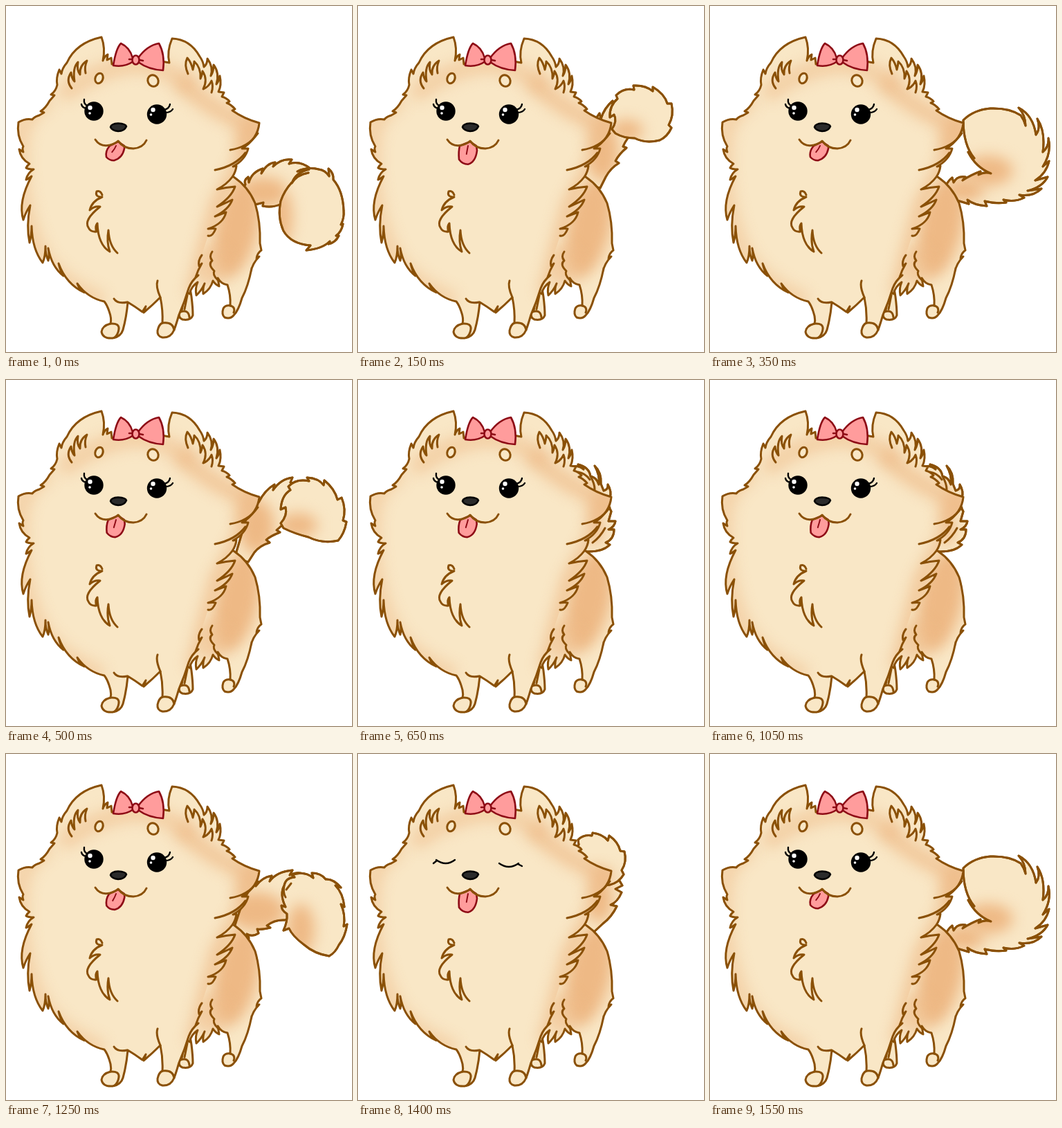
An HTML page for the animation above (1600 ms loop, 500x500 px).

```html
<!DOCTYPE html>
<html lang="en">
<head>
<meta charset="utf-8">
<title>Fluffy dog</title>
<style>
html, body { margin: 0; width: 100%; height: 100%; overflow: hidden; background: #fff; }
svg { display: block; width: 100vw; height: 100vh; }
.fill { fill: #f9e7c6; }
.ink { fill: none; stroke: #8a5006; stroke-width: 3; stroke-linecap: round; stroke-linejoin: round; }
.both { fill: #f9e7c6; stroke: #8a5006; stroke-width: 3; stroke-linecap: round; stroke-linejoin: round; }
.shade { fill: #eeb985; filter: url(#soft); }
.glow { fill: none; stroke: #eeb985; stroke-width: 26; filter: url(#soft); }
.pink { fill: #ff9c9c; stroke: #8e0c16; stroke-width: 2.6; stroke-linejoin: round; stroke-linecap: round; }
.lash { fill: none; stroke: #000; stroke-width: 2.4; stroke-linecap: round; }
</style>
</head>
<body>
<svg viewBox="0 0 500 500">
<defs>
  <filter id="soft" x="-70%" y="-70%" width="240%" height="240%" color-interpolation-filters="sRGB"><feGaussianBlur stdDeviation="10"/></filter>
  <clipPath id="baseClip"><path id="baseCut"/></clipPath>
  <clipPath id="tipClip"><path id="tipCut"/></clipPath>
  <clipPath id="rumpClip"><use href="#rump"/></clipPath>
  <clipPath id="coatClip"><use href="#coat"/></clipPath>
  <path id="rump" d="M290,240 L329,247 Q350,261 360,285 Q368,312 367,343 L369,353 Q363,357 362,365 L366,362 Q356,372 354,384 L355,379 Q350,405 341,422 Q336,440 329,447 Q324,453 316,450 Q311,446 314,437 Q317,432 324,433 Q325,418 320,403 Q311,402 306,393 L308,405 Q302,402 299,397 Q296,409 285,416 Q284,408 287,401 Q282,412 275,418 Q273,408 277,399 Q268,405 265,416 L240,400 Z"/>
  <path id="coat" d="M283,360 Q277,368 279,376 L283,372 Q277,382 274,392 L278,389 Q268,397 264,408 Q258,428 250,446 Q246,460 243,468 Q238,480 226,479 Q218,477 219,469 Q221,460 226,458 Q227,440 223,421 Q212,432 199,443 L202,434 L197,442 Q186,434 176,428 Q174,450 169,468 Q166,478 154,480 Q140,481 138,471 Q139,462 151,459 Q153,452 149,441 Q146,432 142,427 Q118,422 103,401 Q106,410 113,414 Q87,402 76,372 Q78,382 83,390 Q66,377 61,350 Q63,361 61,368 Q57,359 57,347 Q57,362 53,371 Q38,352 37,318 Q37,331 34,342 Q29,318 35,288 Q28,299 25,309 Q17,283 37,246 Q32,250 29,251 Q31,241 40,236 Q32,236 29,234 Q31,230 34,228 Q21,221 19,207 L25,211 Q23,206 25,203 Q15,187 18,168 Q28,162 38,164 Q41,160 48,158 L55,154 L50,152 Q57,148 63,137 L70,129 L65,128 Q72,123 74,114 Q72,104 77,92 L80,98 Q81,90 88,82 Q101,53 138,45 Q144,61 140,79 Q142,73 147,70 L146,78 L152,75 L153,84 Q188,72 236,82 Q232,66 240,47 Q266,48 280,73 Q285,80 286,88 Q291,84 291,76 Q300,88 296,101 Q300,95 300,85 Q309,97 304,113 Q308,108 309,101 Q312,114 307,124 L315,125 L312,131 Q319,133 323,138 L319,140 Q326,143 331,149 L327,151 Q344,163 366,169 Q364,192 341,206 L350,206 Q346,222 328,232 L333,231 Q332,240 327,247 Q319,258 305,265 Q318,262 331,261 Q326,276 305,290 Q317,285 327,280 Q322,294 302,304 L318,298 Q314,315 292,322 Q300,321 303,322 Q298,334 292,332"/>
</defs>
<rect width="500" height="500" fill="#fff"/>

<g id="tail">
  <path id="base" class="both"/>
  <g id="baseShade" clip-path="url(#baseClip)"></g>
  <path id="baseLine" class="ink"/>
  <path id="tip" class="both"/>
  <g id="tipShade" clip-path="url(#tipClip)"></g>
  <path id="tipLine" class="ink"/>
</g>

<path class="both" d="M264,396 L268,420 Q270,436 270,447 Q267,455 255,453 Q248,450 251,443 Q256,440 255,428 L250,410"/>
<path class="ink" d="M252,442 Q264,438 265,450 M262,418 L258,438"/>

<use href="#rump" class="fill"/>
<g clip-path="url(#rumpClip)">
  <ellipse class="shade" cx="334" cy="318" rx="31" ry="75" transform="rotate(12 334 318)"/>
  <ellipse class="shade" cx="296" cy="375" rx="28" ry="30" opacity=".55"/>
</g>
<use href="#rump" class="ink"/>
<path class="ink" d="M324,433 Q332,435 329,443 M298,355 Q293,362 298,368 Q291,373 301,383 Q298,388 306,396"/>

<use href="#coat" class="fill"/>
<g clip-path="url(#coatClip)">
  <path class="glow" opacity=".45" d="M62,134 Q20,158 20,200 Q15,290 50,360 Q74,400 140,428"/>
  <path class="glow" opacity=".65" d="M250,105 Q290,150 364,176 Q335,240 308,285 Q292,340 272,420"/>
  <path class="glow" opacity=".5" d="M80,130 Q125,92 188,84 Q240,90 270,118"/>
  <ellipse class="shade" cx="352" cy="184" rx="20" ry="32" transform="rotate(22 352 184)" opacity=".7"/>
</g>
<use href="#coat" class="ink"/>

<g class="ink">
  <path d="M226,458 Q241,456 243,468 M151,459 Q164,458 163,467 Q162,475 157,479 M219,397 Q216,405 223,421"/>
  <path d="M364,184 Q350,204 324,208 M346,212 Q332,231 302,237"/>
  <path d="M156,423 Q161,431 175,428"/>
  <path d="M139,273 Q136,266 131,268 Q128,276 139,276 Q124,282 121,295 Q127,289 136,290 Q112,309 119,320 Q122,327 131,326 Q128,319 132,314 Q133,345 150,355 Q145,341 148,324 Q149,346 161,357"/>
  <path d="M95,119 Q86,108 94,96 Q95,105 99,109 Q96,89 104,81 Q102,93 107,99 Q106,86 117,79 Q113,88 115,97"/>
  <path d="M263,98 Q257,85 262,75 Q268,82 270,92 Q272,85 272,80 Q282,89 281,105 Q284,98 284,94 Q292,106 285,120 Q293,117 297,108 Q300,116 297,125"/>
</g>

<g class="both">
  <ellipse cx="134.500" cy="104.500" rx="5.500" ry="7.500" transform="rotate(20 134.500 104.500)"/>
  <ellipse cx="212.500" cy="108" rx="7.500" ry="8.500" transform="rotate(-25 212.500 108)"/>
</g>

<g class="pink">
  <path d="M183,75 Q179,60 166,54 Q159,61 155,86 Q171,89 184,80 Z"/>
  <path d="M191,75 Q204,57 221,54 Q230,70 227,93 Q206,92 191,81 Z"/>
  <ellipse cx="187.500" cy="78" rx="5" ry="6.500"/>
  <path d="M178,77 L182,77 M193,78 L198,79"/>
</g>

<g id="eyes">
  <circle cx="127" cy="152" r="13.700"/>
  <circle cx="121.500" cy="147" r="3.200" fill="#fff"/><circle cx="121" cy="155" r="1.800" fill="#fff"/>
  <path class="lash" d="M116,148 Q110,147 109,142 M117,144 Q112,141 113,135"/>
  <circle cx="218" cy="156.500" r="14.200"/>
  <circle cx="212.500" cy="150" r="3.200" fill="#fff"/><circle cx="209.500" cy="157" r="1.800" fill="#fff"/>
  <path class="lash" d="M229,150 Q236,148 237,142 M230,154 Q238,154 241,149"/>
</g>
<path id="lids" class="lash" d="M113,153 Q127,163 140,153 M204,158 Q218,168 232,158 M114,154 L109,158 M231,159 L237,162"/>

<path id="tongue" class="pink"/>
<path id="crease" class="pink" style="fill:none;stroke-width:2"/>
<path class="ink" d="M129,193 Q136,204 150,201 Q158,199 162,195 Q170,206 184,206 Q198,205 203,194"/>
<path d="M151,175 Q152,170 162,169.500 Q173,170 174,174 Q171,181 162,181 Q153,180 151,175 Z" fill="#2b2b2b" stroke="#000" stroke-width="2.500"/>
</svg>

<script>
const $ = id => document.getElementById(id);
const STEP = 50, LOOP = 1600, WAG = 8;

// One wag, eight drawings. Shades are [cx, cy, rx, ry].
const poses = [
  { base: "M335,276 L346,258 Q343,252 350,247 L351,255 Q355,240 371,235 L369,242 Q377,227 389,226 L386,232 Q398,220 413,222 L409,228 Q425,223 440,235 L430,262 L398,286 Q385,292 371,289 L372,284 L360,287 Z",
    tip: "M437,241 Q420,244 413,256 Q419,240 438,236 L421,239 Q435,232 452,236 Q461,237 467,246 L466,235 Q474,242 473,251 Q487,267 488,296 Q489,306 484,316 L487,315 Q485,326 477,332 L481,332 Q476,342 466,344 L468,340 Q457,351 434,353 L440,346 Q412,344 401,325 Q392,305 397,282 Q402,267 413,255",
    s: [[372, 269, 36, 22]], u: [[398, 305, 16, 42]] },
  { base: "M326,262 L340,220 Q349,196 362,185 L361,191 Q370,178 384,176 L381,184 Q391,170 414,168 L410,175 Q423,169 431,174 L425,230 L403,240 Q388,239 377,248 L382,251 Q369,254 363,253 L365,259 Q356,265 348,260 L351,266 L333,258 Z",
    tip: "M409,252 L401,255 Q407,242 406,231 Q398,226 398,219 L404,221 Q395,203 402,190 Q404,179 417,178 L413,175 Q430,168 444,179 L442,172 Q455,172 462,181 Q473,180 484,193 L476,190 Q487,201 489,221 L484,217 Q491,232 488,249 L493,246 Q490,265 481,276 Q476,287 467,292 Q446,289 430,275 Q414,263 409,252",
    line: "M402,190 Q400,201 404,207 M412,187 L405,196",
    s: [[362, 227, 42, 28]], u: [[426, 254, 20, 38]] },
  { base: "M330,258 L345,208 Q351,183 365,169 L365,177 Q374,159 388,151 L386,159 Q397,143 414,141 L411,148 L430,151 L424,196 Q402,206 391,217 L396,220 Q381,226 376,231 L381,235 Q367,239 359,249 L350,263 Z",
    tip: "M401,214 L397,207 Q407,196 404,184 L397,187 Q398,167 411,159 L408,154 Q419,142 438,146 L435,141 Q452,142 459,152 L460,145 Q475,157 479,173 L485,170 Q492,187 487,203 L492,205 Q489,222 480,232 Q457,237 437,227 Q417,222 401,214 Z",
    s: [[362, 212, 26, 40]], u: [[422, 210, 28, 18]] },
  { base: "M327,258 L334,195 Q337,170 349,155 L351,163 Q356,147 368,137 L368,146 Q376,133 392,127 L400,180 Q388,191 383,203 L388,205 Q377,214 372,224 L377,227 Q365,234 358,247 L350,263 Z",
    tip: "M372,184 L367,178 Q375,166 370,157 L364,161 Q363,144 375,134 L373,129 Q384,118 399,121 L398,115 Q415,114 426,123 L426,117 Q443,127 447,141 L453,141 Q457,158 449,172 L453,176 Q447,189 436,194 Q415,199 400,191 Q384,191 372,184 Z",
    s: [[353, 210, 24, 44]], u: [[388, 180, 24, 16]] },
  { base: "M315,250 L316,175 Q317,154 328,142 L331,150 L360,153 L382,190 L372,195 L381,200 Q375,214 365,218 L374,220 Q367,235 354,245 L340,258 Z",
    tip: "M311,164 Q307,144 319,131 L318,124 Q326,116 338,118 L339,114 Q354,116 361,125 L363,118 Q376,127 379,140 L385,141 Q389,156 381,168 L384,174 Q377,186 364,189 Q335,192 311,164 Z",
    s: [[348, 210, 20, 34]], u: [[345, 177, 24, 14]] },
  { base: "M300,250 L305,170 L350,158 L366,190 L362,204 L372,204 Q371,212 362,216 L370,216 Q370,230 358,235 L364,238 Q353,249 329,248 Z",
    tip: "M300,170 L306,127 Q316,121 326,129 L318,122 Q334,126 336,139 Q345,141 348,151 Q350,138 342,124 Q352,133 351,150 L355,160 Q362,158 361,151 Q367,161 364,170 L350,185 Z",
    line: "M318,133 Q329,135 335,144 M336,139 Q342,150 342,158 M357,214 Q350,227 339,235",
    s: [[342, 215, 10, 24]], u: [[330, 163, 18, 14]] },
  { base: "M325,262 L345,225 Q355,214 370,211 L367,217 Q376,203 388,198 L425,185 L424,211 L419,207 Q417,224 404,232 L407,237 Q395,248 382,250 L386,255 Q370,263 357,262 L352,270 Z",
    tip: "M388,207 L380,211 Q376,200 368,196 L363,200 Q347,180 344,153 Q345,132 358,121 Q375,112 394,116 L391,113 Q408,117 415,129 L416,121 Q429,134 430,150 L437,148 Q441,168 434,183 L438,188 Q433,205 421,216 Q407,216 388,207 Z",
    s: [[370, 239, 38, 20]], u: [[391, 199, 26, 15]] },
  { base: "M338,267 Q342,254 350,248 L352,255 Q357,245 369,247 L365,252 Q377,244 391,239 L388,244 Q397,239 406,242 Q384,233 373,211 L382,220 Q366,201 366,165 Q381,150 405,148 Q433,147 449,158 Q454,165 456,173 Q456,158 446,147 Q467,158 471,186 Q478,177 473,163 Q485,181 481,211 Q490,203 489,191 Q494,212 481,232 L490,224 Q486,242 470,252 L488,247 Q480,262 459,267 L479,264 Q467,276 447,273 L454,277 Q440,284 424,280 L428,284 Q412,286 397,282 L400,289 Q382,288 372,280 L374,286 L354,280 Z",
    tip: "",
    s: [[366, 266, 30, 17], [402, 238, 36, 22]], u: [] }
];

const blobs = list => list.map(([x, y, a, b]) =>
  `<ellipse class="shade" cx="${x}" cy="${y}" rx="${a}" ry="${b}"/>`).join("");

function drawTail(p) {
  for (const id of ["base", "baseCut", "baseLine"]) $(id).setAttribute("d", p.base);
  for (const id of ["tip", "tipCut"]) $(id).setAttribute("d", p.tip);
  $("tipLine").setAttribute("d", p.tip + (p.line || ""));
  $("baseShade").innerHTML = blobs(p.s);
  $("tipShade").innerHTML = blobs(p.u);
}

// Pants between a short side tilt and a long straight tongue.
function drawTongue(k) {
  const mix = (a, b) => (a + (b - a) * k).toFixed(1);
  const low = mix(223, 229);
  $("tongue").setAttribute("d",
    `M${mix(150, 147)},202 Q${mix(143, 145)},210 ${mix(145, 146)},${mix(218, 222)} ` +
    `Q${mix(149, 151)},${low} ${mix(156, 159)},${low} ` +
    `Q${mix(168, 170)},${mix(220, 226)} ${mix(171, 172)},${mix(206, 209)} L171,202 L162,196 Z`);
  $("crease").setAttribute("d", `M159,202 Q${mix(157, 158)},207 ${mix(153, 157)},${mix(211, 214)}`);
}

function drawEyes(open) {
  $("eyes").setAttribute("transform", `translate(0 ${155 * (1 - open)}) scale(1 ${open})`);
  $("eyes").style.display = open > 0 ? "" : "none";
  $("lids").style.display = open > 0 ? "none" : "";
}

let last = -1;
function draw(t) {
  const n = Math.floor((t % LOOP) / STEP);
  if (n === last) return;
  last = n;
  drawTail(poses[n % WAG]);
  drawTongue((1 - Math.cos((n + 0.5) / WAG * 2 * Math.PI)) / 2);
  drawEyes(Math.min(1, Math.abs(n - 28) / 2));
}

const start = performance.now();
function tick() {
  draw(performance.now() - start);
  requestAnimationFrame(tick);
}
draw(0);
requestAnimationFrame(tick);
</script>
</body>
</html>
```
